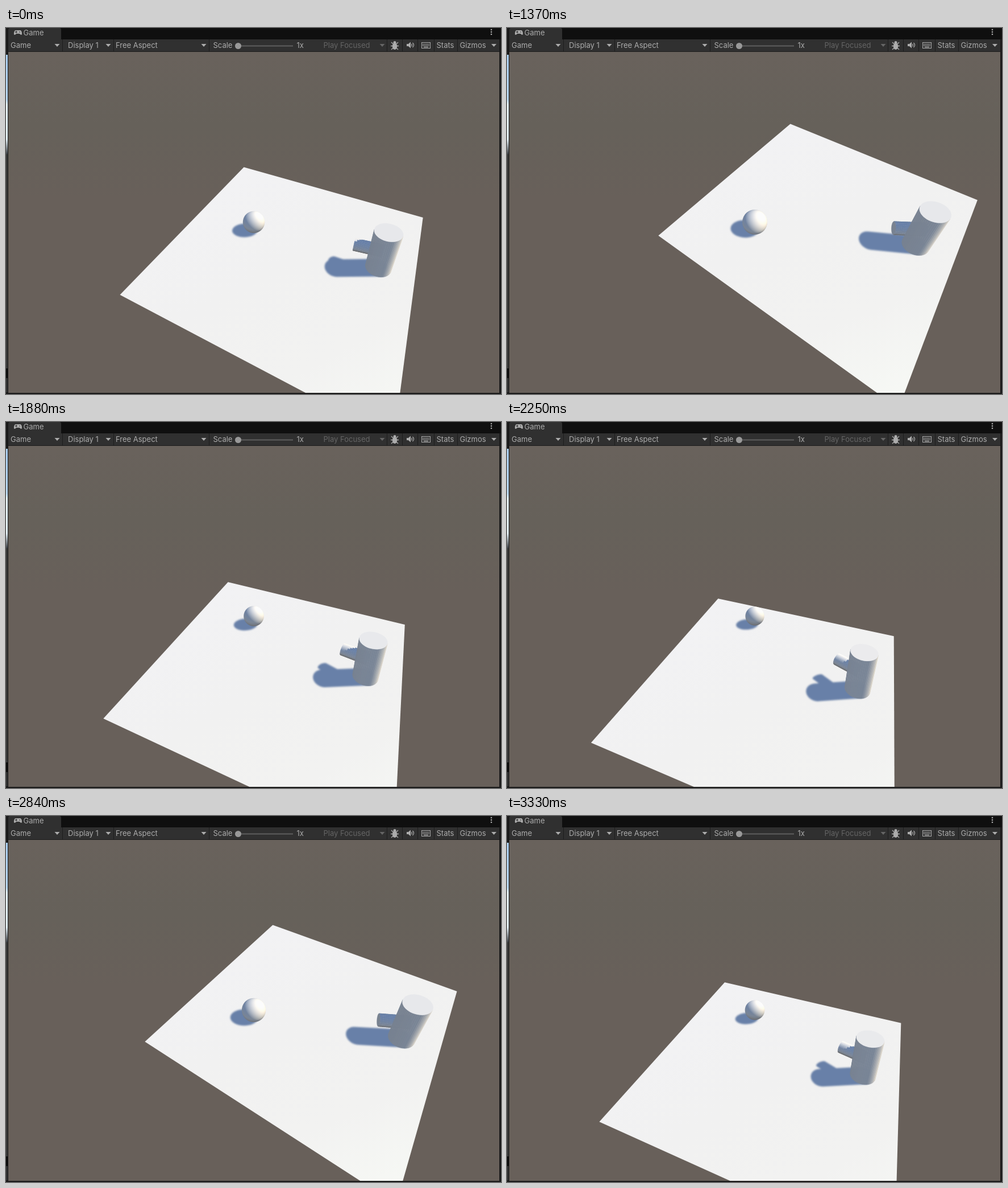
Write an HTML page with a canvas that moves like this. It is 871x643 px and loops after 3900 ms.

```html
<!DOCTYPE html>
<html lang="en">
<head>
<meta charset="utf-8">
<title>Game view</title>
<style>
  html, body { margin: 0; width: 100%; height: 100%; overflow: hidden; background: #191919; }
  canvas, svg { position: absolute; left: 0; top: 0; width: 871px; height: 643px; }
  text { font: 13px Inter, Roboto, sans-serif; fill: #acacac; }
</style>
</head>
<body>
<canvas id="view" width="871" height="643"></canvas>
<svg viewBox="0 0 871 643">
  <defs>
    <linearGradient id="strip" x1="0" y1="0" x2="0" y2="1">
      <stop offset="0" stop-color="#a9cdf0"/>
      <stop offset=".45" stop-color="#b9d8f4"/>
      <stop offset=".5" stop-color="#e6f3fb"/>
      <stop offset=".85" stop-color="#e2eef4"/>
      <stop offset="1" stop-color="#3a3d42"/>
    </linearGradient>
    <path id="arrow" d="M-4.5-2.5h9L0 2.5z"/>
  </defs>
  <rect width="871" height="20" fill="#0f0f0f"/>
  <path d="M4 20V3q0-3 3-3h87q3 0 3 3v17z" fill="#303030"/>
  <rect x="4" y="20" width="864" height="21" fill="#303030"/>
  <path d="M0 41.5H871M99.5 20V41M189.5 20V41M357.5 20V41M670.5 20V41M697.5 20V41M724.5 20V41M753.5 20V41M794.5 20V41" stroke="#1d1d1d"/>
  <path d="M0 0H4V643H0zM868 20H871V643H868zM0 641H871V643H0z" fill="#191919"/>
  <path d="M0 222H3V598H0z" fill="#383838"/>
  <path d="M0 598H3V615H0z" fill="#0c0c0c"/>
  <path d="M0 615H3V640H0z" fill="#303030"/>
  <rect y="47" width="3" height="175" fill="url(#strip)"/>

  <g fill="#acacac">
    <path d="M17 4h8c3 0 4 8 2 8-2 0-2-2-4-2h-4c-2 0-2 2-4 2-2 0-1-8 2-8z"/>
    <path d="M16 7h4M18 5v4M23 7h2" stroke="#303030" stroke-width="1.2"/>
    <circle cx="854" cy="3" r="1.3"/><circle cx="854" cy="7" r="1.3"/><circle cx="854" cy="11" r="1.3"/>
    <use href="#arrow" x="90" y="30.5"/><use href="#arrow" x="180" y="30.5"/>
    <use href="#arrow" x="348" y="30.5"/><use href="#arrow" x="858.5" y="30.5"/>
    <use href="#arrow" x="662" y="30.5" fill="#656565"/>
    <ellipse cx="684" cy="32" rx="4.2" ry="6"/><circle cx="684" cy="25.5" r="2.5"/>
    <path d="M678 25l3 3M690 25l-3 3M677 31.5h14M678 38l3-3M690 38l-3-3" stroke="#acacac" stroke-width="1.3"/>
    <path d="M705 28h3l4-3.5v11l-4-3.5h-3z"/>
    <path d="M713.5 28q2 2 0 4.5M715.5 26q4 4 0 8" fill="none" stroke="#acacac" stroke-width="1.2"/>
    <rect x="731.5" y="25.5" width="15" height="10" fill="none" stroke="#acacac"/>
    <path d="M733 28.5h12M733 31h12" stroke="#acacac" stroke-width="1.4" stroke-dasharray="1.8 1"/>
    <path d="M735 33.5h8" stroke="#acacac" stroke-width="1.3"/>
  </g>
  <path d="M409 31.5H505" stroke="#5e5e5e" stroke-width="2"/>
  <circle cx="408.5" cy="31.5" r="5.5" fill="#999"/>
  <text x="30.5" y="12.5">Game</text>
  <text x="8" y="35">Game</text>
  <text x="109" y="35">Display 1</text>
  <text x="193" y="35">Free Aspect</text>
  <text x="364.5" y="35">Scale</text>
  <text x="511.5" y="35">1x</text>
  <text x="558.5" y="35" style="fill:#656565">Play Focused</text>
  <text x="757.5" y="35">Stats</text>
  <text x="798.5" y="35">Gizmos</text>
</svg>
<script>
const LOOP = 3900, CX = 436, CY = 341, FOCAL = 518;
const ctx = document.getElementById('view').getContext('2d');

const add = (a, b, k = 1) => a.map((v, i) => v + b[i] * k);
const dot = (a, b) => a[0] * b[0] + a[1] * b[1] + a[2] * b[2];
const cross = (a, b) => [a[1] * b[2] - a[2] * b[1], a[2] * b[0] - a[0] * b[2], a[0] * b[1] - a[1] * b[0]];
const unit = a => a.map(v => v / Math.hypot(...a));
const mix = (a, b, k) => a.map((v, i) => v + (b[i] - v) * k);

// World: x right, y up, z towards the viewer; the floor is 10 x 10.
const UP = [0, 1, 0], CAM = [2.43, 9.735, 8.32], CANNON = [3.49, 1, -0.82];
const LIGHT = unit([0.727, 1, -0.419]);
const SKY = [104, 128, 168], SIDE = [122, 133, 149], GROUND = [100, 96, 92], SUN = [178, 146, 94];
const SHADOW = 'rgb(104,128,168)';
const BIAS = 0.045; // shadow casters are slightly smaller than their shapes

// Ball travel: start time, time per step, steps, from, to, initial slope.
const MOVES = [
  [990, 47, 11, -0.47, 2.67, -0.15],
  [1600, 45, 11, 2.67, -3.65, 0.58],
  [2250, 51, 11, -3.65, 2.41, 0.1],
  [2800, 37.5, 9, 2.41, -2.58, 0.35]
];

function ballZ(t) {
  let z = MOVES[0][3];
  for (const [start, step, n, from, to, slope] of MOVES) {
    if (t < start) break;
    const u = Math.min(n, Math.floor((t - start) / step) + 1) / n;
    const e = slope * u * (1 - u) ** 2 + u * u * (3 - 2 * u);
    z = from + (to - from) * e;
  }
  return z;
}

let view;
function lookAt(target) {
  const f = unit(add(target, CAM, -1)), r = unit(cross(f, UP));
  view = { f, r, u: cross(r, f) };
}
function project(p) {
  const d = add(p, CAM, -1), k = FOCAL / dot(d, view.f);
  return [CX + dot(d, view.r) * k, CY - dot(d, view.u) * k];
}

function shade(n, shadowed) {
  const amb = n[1] > 0 ? mix(SIDE, SKY, n[1]) : mix(SIDE, GROUND, -n[1]);
  const lit = shadowed ? 0 : Math.max(0, dot(n, LIGHT));
  return add(amb, SUN, lit).map(c => Math.min(252, c));
}
const css = c => `rgb(${c.map(Math.round)})`;

function trace(points) {
  points.forEach(([x, y], i) => i ? ctx.lineTo(x, y) : ctx.moveTo(x, y));
  ctx.closePath();
}
function face(points, color, seam = 0.6) {
  ctx.beginPath();
  trace(points.map(project));
  ctx.fillStyle = ctx.strokeStyle = color;
  ctx.lineWidth = seam;
  ctx.fill();
  if (seam) ctx.stroke();
}

const around = (c, a, b, r, ang) => add(add(c, a, r * Math.cos(ang)), b, r * Math.sin(ang));
const ring = (c, a, b, r) => Array.from({ length: 48 }, (_, i) => around(c, a, b, r, i * Math.PI / 24));

// Does the upright body stand between p and the light?
function behindBody(p) {
  const d = add(p, CANNON, -1), hh = LIGHT[0] ** 2 + LIGHT[2] ** 2;
  const along = d[0] * LIGHT[0] + d[2] * LIGHT[2], mid = -along / hh;
  const gap = 0.25 - (d[0] ** 2 + d[2] ** 2 - along * along / hh);
  return mid > 0 && gap > 0 && p[1] + (mid - Math.sqrt(gap / hh)) * LIGHT[1] < 2;
}

function tube(base, axis, len, r, a, b, rows, shadowTest) {
  const segs = 48, turn = 2 * Math.PI / segs;
  for (let i = 0; i < segs; i++) {
    const n = around([0, 0, 0], a, b, 1, (i + 0.5) * turn);
    if (dot(n, add(add(base, n, r), CAM, -1)) > 0) continue;
    for (let j = 0; j < rows; j++) {
      const c0 = add(base, axis, len * j / rows), c1 = add(base, axis, len * (j + 1) / rows);
      const mid = add(mix(c0, c1, 0.5), n, r);
      face([around(c0, a, b, r, i * turn), around(c0, a, b, r, (i + 1) * turn),
        around(c1, a, b, r, (i + 1) * turn), around(c1, a, b, r, i * turn)],
        css(shade(n, shadowTest && shadowTest(mid))));
    }
  }
  const end = add(base, axis, len);
  if (dot(axis, add(end, CAM, -1)) < 0)
    face(ring(end, a, b, r), css(shade(axis, shadowTest && shadowTest(end))), 0.3);
}

function hull(points) {
  const pts = points.slice().sort((p, q) => p[0] - q[0] || p[1] - q[1]);
  const half = list => {
    const out = [];
    for (const p of list) {
      while (out.length > 1) {
        const [o, q] = out.slice(-2);
        if ((q[0] - o[0]) * (p[1] - o[1]) - (q[1] - o[1]) * (p[0] - o[0]) > 0) break;
        out.pop();
      }
      out.push(p);
    }
    return out.slice(0, -1);
  };
  return half(pts).concat(half(pts.reverse()));
}
function drop(p) {
  const h = Math.max(0, p[1]);
  return project([p[0] - 0.727 * h, 0, p[2] + 0.419 * h]);
}

const SIZE = 48;
const sprite = document.createElement('canvas');
sprite.width = sprite.height = SIZE;
const sctx = sprite.getContext('2d');
function drawBall(pos) {
  const r = FOCAL * 0.5 / Math.hypot(...add(pos, CAM, -1));
  const img = sctx.createImageData(SIZE, SIZE);
  for (let i = 0; i < SIZE * SIZE; i++) {
    const x = (i % SIZE + 0.5 - SIZE / 2) / r, y = (Math.floor(i / SIZE) + 0.5 - SIZE / 2) / r;
    const d = Math.hypot(x, y), alpha = Math.min(1, (1 - d) * r + 0.5);
    if (alpha <= 0) continue;
    const k = d > 1 ? 1 / d : 1, depth = Math.sqrt(Math.max(0, 1 - d * d));
    const n = add(add(view.r.map(v => v * x * k), view.u, -y * k), view.f, -depth);
    img.data.set([...shade(n), alpha * 255], i * 4);
  }
  sctx.putImageData(img, 0, 0);
  ctx.drawImage(sprite, CX - SIZE / 2, CY - SIZE / 2);
}

function gradient(p, q, colors) {
  const g = ctx.createLinearGradient(...p, ...q);
  colors.forEach((c, i) => g.addColorStop(i / (colors.length - 1), c));
  return g;
}

function draw(t) {
  const ball = [-2.03, 0.5, ballZ(t)];
  lookAt(ball);
  ctx.fillStyle = gradient([0, 42], [0, 300], ['#69625c', '#66615a', '#68605a']);
  ctx.fillRect(4, 42, 864, 599);

  const far = [-5, 0, -5], near = [5, 0, 5];
  face([far, [5, 0, -5], near, [-5, 0, 5]],
    gradient(project(far), project(near), ['#f2f2f4', '#f1f1f1', '#f2f2f1', '#f7f9f5']), 0);

  const aim = unit(add(ball, CANNON, -1)), side = unit(cross(aim, UP)), top = cross(side, aim);
  const foot = add(CANNON, top, -1), muzzle = add(CANNON, aim, 1.1 - BIAS);
  const la = unit(cross(LIGHT, UP)), lb = cross(la, LIGHT);

  ctx.save();
  ctx.filter = 'blur(1.8px)';
  ctx.fillStyle = SHADOW;
  ctx.beginPath();
  const wide = 0.5 - BIAS, thin = 0.25 - BIAS;
  trace(hull([...ring(foot, side, aim, wide), ...ring(add(CANNON, top, 1 - BIAS), side, aim, wide)].map(drop)));
  trace(hull([...ring(CANNON, side, top, thin), ...ring(muzzle, side, top, thin)].map(drop)));
  trace(hull(ring(ball, la, lb, wide).map(drop)));
  ctx.fill();
  ctx.restore();

  tube(CANNON, aim, 1.1, 0.25, side, top, 14, behindBody);
  tube(foot, top, 2, 0.5, side, aim, 1);
  drawBall(ball);
}

function tick() {
  draw(performance.now() % LOOP);
  requestAnimationFrame(tick);
}
tick();
</script>
</body>
</html>
```
